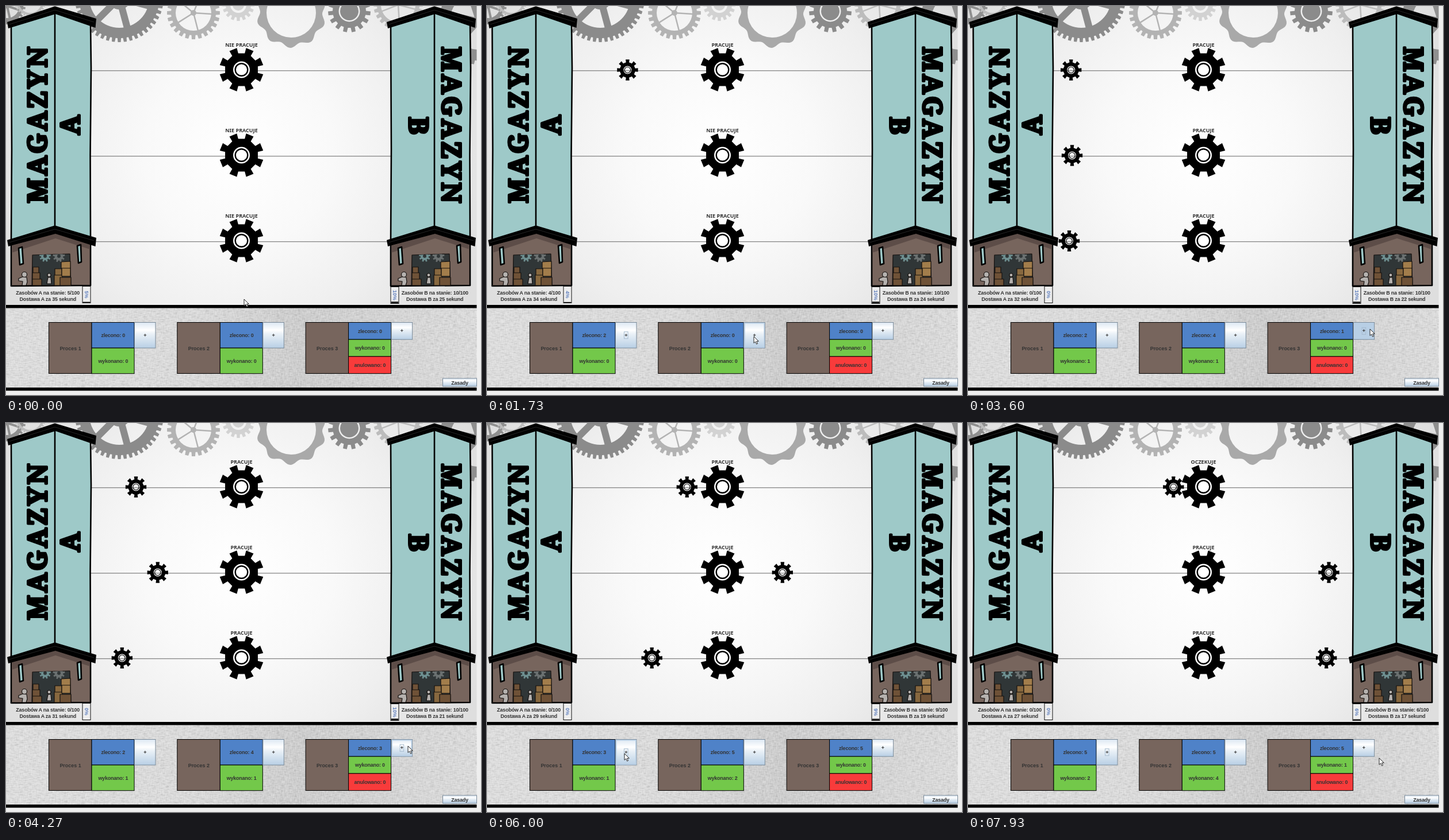
An HTML page for the animation above (8000 ms loop, 826 by 678 pixels).

```html
<!DOCTYPE html>
<html lang="pl">
<head>
<meta charset="utf-8">
<title>Magazyn</title>
<style>
html, body { margin: 0; width: 100%; height: 100%; overflow: hidden; background: #eee; }
svg { display: block; width: 100%; height: 100%; }
text { font: bold 8.94px "Liberation Sans", Arial, sans-serif; letter-spacing: -.2px; fill: #333; text-anchor: middle; }
.status { font: 600 9px "Noto Sans", "Open Sans", sans-serif; letter-spacing: 0; }
.sign { font: 900 45.5px "Noto Serif", serif; fill: #000; stroke: #000; stroke-width: 4; stroke-linejoin: round; letter-spacing: 4.8px; }
.bar { fill: #6382bf; letter-spacing: 0; }
.ink { stroke: #000; stroke-width: 2.6; stroke-linejoin: round; }
.thin { stroke: #15110f; stroke-width: 1.2; stroke-linejoin: round; }
.box { stroke: #000; stroke-width: 1; }
</style>
</head>
<body>
<svg id="stage" viewBox="0 0 826 678">
  <defs>
    <radialGradient id="light" gradientUnits="userSpaceOnUse" cx="405" cy="255" r="470">
      <stop offset="0" stop-color="#fff"/><stop offset=".35" stop-color="#f9f9f9"/>
      <stop offset=".65" stop-color="#efefef"/><stop offset="1" stop-color="#dedede"/>
    </radialGradient>
    <linearGradient id="wall">
      <stop offset="0" stop-color="#dedede"/><stop offset=".4" stop-color="#dbdbdb"/>
      <stop offset=".62" stop-color="#cdcdcd"/><stop offset="1" stop-color="#dcdcdc"/>
    </linearGradient>
    <linearGradient id="metal" x2="0" y2="1">
      <stop offset="0" stop-color="#dde8f3"/><stop offset=".3" stop-color="#fff"/>
      <stop offset=".45" stop-color="#eaf1f7"/><stop offset="1" stop-color="#b8cfe5"/>
    </linearGradient>
    <filter id="grain" x="0" y="0" width="1" height="1" color-interpolation-filters="sRGB">
      <feTurbulence type="fractalNoise" baseFrequency=".13 .6" numOctaves="2" seed="4"/>
      <feColorMatrix values="0 0 0 0 .35  0 0 0 0 .35  0 0 0 0 .35  .45 0 0 0 -.19"/>
    </filter>
    <filter id="glint" x="0" y="0" width="1" height="1" color-interpolation-filters="sRGB">
      <feTurbulence type="fractalNoise" baseFrequency=".6 .13" numOctaves="2" seed="9"/>
      <feColorMatrix values="0 0 0 0 1  0 0 0 0 1  0 0 0 0 1  .8 0 0 0 -.34"/>
    </filter>
    <clipPath id="room"><rect width="818.5" height="522"/></clipPath>
    <clipPath id="door"><path d="M46 434L111 432L113 487H45Z"/></clipPath>
    <g id="house">
      <path class="ink" fill="#9ec9c8" d="M9 32L85 10L147 30L148 108L146.500 260L147 407L85 388L9 410L10 250Z"/>
      <path class="ink" d="M85 10V388"/>
      <path class="ink" fill="#77655d" d="M9 412L85 390L147 410L147 487L9 488Z"/>
      <path fill="#5d4d48" d="M10 418L86 396L146 415V424L86 405L10 430Z"/>
      <path class="ink" fill="#9ec9c8" stroke-width="2" d="M22 422L28 420L30 449L24 451ZM124 418L130 416L131 446L126 448Z"/>
      <path class="thin" fill="#303637" d="M46 434L111 432L113 487H45Z"/>
      <g id="hall" clip-path="url(#door)"></g>
      <path class="thin" fill="#6f5237" d="M47 455H57V465H47ZM46 465H59V476H46ZM46 476H62V487H46Z"/>
      <path class="thin" fill="#87683f" d="M85 458H97V469H85ZM84 469H98V487H84Z"/>
      <path class="thin" fill="#a27d4b" d="M96 446L112 445V457H96ZM97 457H112V471H97Z"/>
      <path class="thin" fill="#6f5237" d="M94 473H113V487H94Z"/>
      <g class="thin" fill="#b5b1ae">
        <path d="M29 472L36 473L37 481L35 487H28L29 480L22 479V475Z"/><circle cx="32" cy="468" r="4.500"/>
        <path d="M73 473H78L79 484H71Z"/><circle cx="75" cy="469" r="3"/>
      </g>
      <path d="M2 28L85 .5L157 22L155.500 38L86 14L4 39ZM2 408L85 382.500L157 404L155.500 419L86 397L4 419Z"/>
      <path d="M6 32L85 7L153 28M6 412L85 389L153 409" fill="none" stroke="#252525" stroke-width="1"/>
    </g>
  </defs>

  <rect width="826" height="678" fill="#eee"/>
  <g clip-path="url(#room)">
    <rect width="819" height="522" fill="url(#light)"/>
    <g id="decor"></g>
  </g>
  <path d="M147 112.800H669M147 261.800H669M147 410.800H669" stroke="#555" stroke-width=".9"/>
  <use href="#house"/><use href="#house" x="660"/>
  <text class="sign" transform="translate(71 205) rotate(-90)">MAGAZYN</text>
  <text class="sign" transform="translate(128 205) rotate(-90)">A</text>
  <text class="sign" transform="translate(758 209.500) rotate(90)">MAGAZYN</text>
  <text class="sign" transform="translate(701 211) rotate(90)">B</text>

  <rect y="526" width="818.500" height="140" fill="url(#wall)"/>
  <rect y="526" width="818.500" height="140" filter="url(#grain)"/>
  <rect y="526" width="818.500" height="140" filter="url(#glint)"/>
  <path d="M0 521H818.500V526.500H0ZM0 665H818.500V670.500H0Z"/>
  <g id="live"></g>
  <path id="cursor" d="M0 0V11.500L2.700 9L4.600 13.300L6.600 12.400L4.700 8.300H8.300Z" fill="#fff" stroke="#111" stroke-width=".9"/>
</svg>
<script>
const $ = id => document.getElementById(id);
const live = $("live");

function add(parent, tag, attrs, label) {
  const el = document.createElementNS("http://www.w3.org/2000/svg", tag);
  for (const k in attrs) el.setAttribute(k, attrs[k]);
  if (label !== undefined) el.textContent = label;
  parent.appendChild(el);
  return el;
}
const rect = (x, y, width, height, attrs) => add(live, "rect", { x, y, width, height, ...attrs });
const label = (x, y, s, attrs) => add(live, "text", { x, y, ...attrs }, s);

const disc = r => `M${r} 0A${r} ${r} 0 1 0 ${-r} 0A${r} ${r} 0 1 0 ${r} 0Z`;

// Toothed outline; base and tip are half widths of a tooth as shares of its pitch.
function cog(n, outer, inner, base, tip, turn = 0) {
  const pts = [];
  for (let i = 0; i < n; i++) {
    for (const [r, d] of [[inner, -base], [outer, -tip], [outer, tip], [inner, base]]) {
      const a = (i + d + turn) * 2 * Math.PI / n;
      pts.push((r * Math.sin(a)).toFixed(2) + " " + (-r * Math.cos(a)).toFixed(2));
    }
  }
  return "M" + pts.join("L") + "Z";
}
const drawCog = (parent, x, y, d, fill) =>
  add(parent, "path", { d, fill, "fill-rule": "evenodd", transform: `translate(${x} ${y})` });

function spokes(x, y, n, r, width, color, turn) {
  let d = "";
  for (let i = 0; i < n; i++) {
    const a = (i + turn) * 2 * Math.PI / n;
    d += `M${x} ${y}L${x + r * Math.cos(a)} ${y + r * Math.sin(a)}`;
  }
  add($("decor"), "path", { d, stroke: color, "stroke-width": width });
}

// Gears along the top edge
const decor = $("decor");
drawCog(decor, 2, 0, cog(26, 32, 28, .32, .22) + disc(21), "#8f8f8f");
spokes(2, 0, 6, 22, 4, "#8f8f8f", .3);
drawCog(decor, 42, -8, cog(30, 27, 24, .3, .2) + disc(20), "#bdbdbd");
drawCog(decor, 197, -14, cog(46, 77, 70, .33, .24) + disc(52), "#8b8b8b");
spokes(197, -14, 6, 55, 12, "#8b8b8b", .25);
drawCog(decor, 197, -14, disc(20), "#8b8b8b");
drawCog(decor, 326, 12, cog(24, 46, 39, .34, .25) + disc(31), "#b3b3b3");
spokes(326, 12, 5, 32, 2.5, "#b3b3b3", .05);
drawCog(decor, 326, 12, disc(5), "#b3b3b3");
drawCog(decor, 404, -2, cog(16, 28, 22, .32, .24) + disc(14) + disc(10), "#d2d2d2");
let wave = "";
for (let i = 0; i < 120; i++) {
  const a = i * Math.PI / 60, r = 57.5 + 3.5 * Math.cos(10 * (a - 1.6));
  wave += (i ? "L" : "M") + (r * Math.cos(a)).toFixed(1) + " " + (r * Math.sin(a)).toFixed(1);
}
drawCog(decor, 496, 12, wave + "Z" + disc(43), "#a9a9a9");
drawCog(decor, 597, 9, cog(15, 37, 29, .3, .22) + disc(18.5) + disc(16), "#8b8b8b");
drawCog(decor, 682, -2, cog(24, 43, 37, .34, .25) + disc(30), "#bcbcbc");
spokes(682, -2, 5, 31, 2.5, "#bcbcbc", .2);
drawCog(decor, 822, 26, cog(44, 76, 69, .33, .24) + disc(50), "#8f8f8f");
spokes(822, 26, 6, 52, 10, "#8f8f8f", .2);
drawCog($("hall"), 68, 436, cog(9, 10, 7, .28, .2) + disc(3), "#6e8f90");
drawCog($("hall"), 92, 436, cog(9, 10.5, 7.5, .28, .2) + disc(3), "#6a7070");

// leg: [shown, departs, arrives, store]
const procs = [
  { clicks: [470, 1070, 5870, 6330, 6730],
    legs: [[470, 755, 3350, "A"], [3350, 3555, 6135, "A"]] },
  { clicks: [1930, 2200, 2470, 2730, 5200],
    legs: [[1930, 2110, 3540, "A"], [3540, 3560, 5019, "A"], [5019, 5019, 6406, "B"],
           [6406, 6406, 7820, "B"], [7820, 7820, 9234, "B"]] },
  { clicks: [3540, 3870, 4070, 4270, 4470], third: true,
    legs: [[3540, 3740, 7440, "A"], [7440, 7550, 11250, "B"]] }
];

const rings = disc(14.5) + disc(12) + disc(9.6);
const bigCog = cog(8, 38.6, 29, .25, .23, .5) + rings;
const smallCog = cog(8, 38, 28, .25, .23) + rings;

procs.forEach((p, i) => {
  const y = 111 + 149 * i, x = 74.5 + 223.3 * i, rowH = p.third ? 29.7 : 44.6;
  p.y = y + .5;
  drawCog(live, 409.5, y, disc(15), "#fff");
  drawCog(live, 409.5, y, bigCog, "#000");
  p.status = label(409.5, y - 40, "", { class: "status" });
  p.cog = add(live, "path", { d: smallCog, "fill-rule": "evenodd" });

  rect(x, 551.5, 74.5, 89, { class: "box", fill: "#77655d" });
  label(x + 37.5, 599.7, "Proces " + (i + 1), { style: "letter-spacing:0" });
  const cells = ["#4f82c8", "#73c84a", "#f83b3b"].slice(0, p.third ? 3 : 2);
  [p.ordered, p.done, p.dropped] = cells.map((fill, k) => {
    rect(x + 74.5, 551.5 + k * rowH, 74, rowH, { class: "box", fill });
    return label(x + 111.8, 551.5 + (k + .5) * rowH + 3.2, "");
  });
  if (p.dropped) p.dropped.textContent = "anulowano: 0";

  const b = p.area = { x: x + 149, y: 551.5, w: 36.5, h: rowH };
  const cx = b.x + b.w / 2, cy = b.y + b.h / 2;
  p.button = rect(b.x, b.y, b.w, b.h, { stroke: "#7a8a99" });
  p.hover = rect(b.x + 1.2, b.y + 1.2, b.w - 2.4, b.h - 2.4, { fill: "none", stroke: "#b8cfe5", "stroke-width": 1.6 });
  p.focus = rect(cx - 3.2, cy - 6, 6.5, 12, { fill: "none", stroke: "#a3b8cc", "stroke-width": .9 });
  label(cx, cy + 3, "+", { style: "letter-spacing:0" });
});

rect(759.5, 649, 59, 14, { fill: "url(#metal)", stroke: "#7a8a99" });
label(789, 659.5, "Zasady");

function store(name, mid, barX, barY, stock, delay) {
  rect(barX, barY, 14, 29, { fill: "#eee", stroke: "#111" });
  return {
    name, stock, delay, base: barY + 28.5,
    fill: rect(barX + .5, 0, 13, 0, { fill: "#222" }),
    pct: add(live, "text", { class: "bar", transform: `translate(${barX + 4} ${barY + 14.5}) rotate(90)` }),
    state: label(mid, 502.7, ""),
    due: label(mid, 514, "")
  };
}
const stores = [store("A", 72.7, 133, 488.5, 5, 35), store("B", 745.7, 669, 489.5, 10, 25)];

// time, x, y of the pointer tip
const path = [
  [0, 414, 511], [67, 400, 520], [133, 281, 573], [266, 281, 573], [333, 240, 573], [1270, 240, 573],
  [1600, 464, 576], [2950, 464, 576], [3300, 699, 563], [4550, 699, 563], [4860, 458, 571],
  [5420, 458, 571], [5760, 239, 576], [6600, 239, 576], [6800, 243, 573], [7330, 243, 573],
  [7800, 715, 584], [8000, 715, 584]
];

function pointer(t) {
  const i = path.findIndex(k => k[0] > t), a = path[i - 1], b = path[i];
  const f = (t - a[0]) / (b[0] - a[0]);
  return [a[1] + (b[1] - a[1]) * f, a[2] + (b[2] - a[2]) * f];
}
const show = (el, on) => el.setAttribute("visibility", on ? "visible" : "hidden");
const count = (times, t) => times.filter(x => x <= t).length;

function render(ms) {
  const step = 200 / 3, t = Math.min(7999, Math.floor((ms + 5) / step) * step);
  const [px, py] = pointer(t);
  $("cursor").setAttribute("transform", `translate(${px.toFixed(1)} ${py.toFixed(1)})`);

  const last = procs.map(p => Math.max(0, ...p.clicks.filter(c => c <= t)));
  const latest = Math.max(...last);
  const used = { A: 0, B: 0 };

  procs.forEach((p, i) => {
    const begun = p.legs.filter(l => l[0] <= t), leg = begun[begun.length - 1];
    begun.forEach(l => used[l[3]]++);
    show(p.cog, leg);
    if (leg) {
      const f = Math.min(1, Math.max(0, (t - leg[1]) / (leg[2] - leg[1])));
      const x = leg[3] === "A" ? 176 + 181.3 * f : 642 - 181.3 * f;
      p.cog.setAttribute("transform", `translate(${x.toFixed(1)} ${p.y}) scale(.485)`);
    }
    p.status.textContent = !leg ? "NIE PRACUJE" : t > leg[2] ? "OCZEKUJE" : "PRACUJE";
    p.ordered.textContent = "zlecono: " + count(p.clicks, t);
    p.done.textContent = "wykonano: " + count(p.legs.map(l => l[2]), t);

    const { x, y, w, h } = p.area;
    const over = px > x && px < x + w && py > y && py < y + h;
    const down = over && last[i] > 0 && t - last[i] < 100;
    p.button.setAttribute("fill", down ? "#b8cfe5" : "url(#metal)");
    show(p.hover, over && !down);
    show(p.focus, latest > 0 && last[i] === latest);
  });

  const ticks = Math.max(0, Math.floor((t + 150) / 1000));
  for (const s of stores) {
    const n = s.stock - used[s.name], h = n * .28;
    s.state.textContent = `Zasobów ${s.name} na stanie: ${n}/100`;
    s.due.textContent = `Dostawa ${s.name} za ${s.delay - ticks} sekund`;
    s.pct.textContent = n + "%";
    s.fill.setAttribute("y", s.base - h);
    s.fill.setAttribute("height", h);
  }
}

function loop() {
  render(performance.now() % 8000);
  requestAnimationFrame(loop);
}
loop();
</script>
</body>
</html>
```
